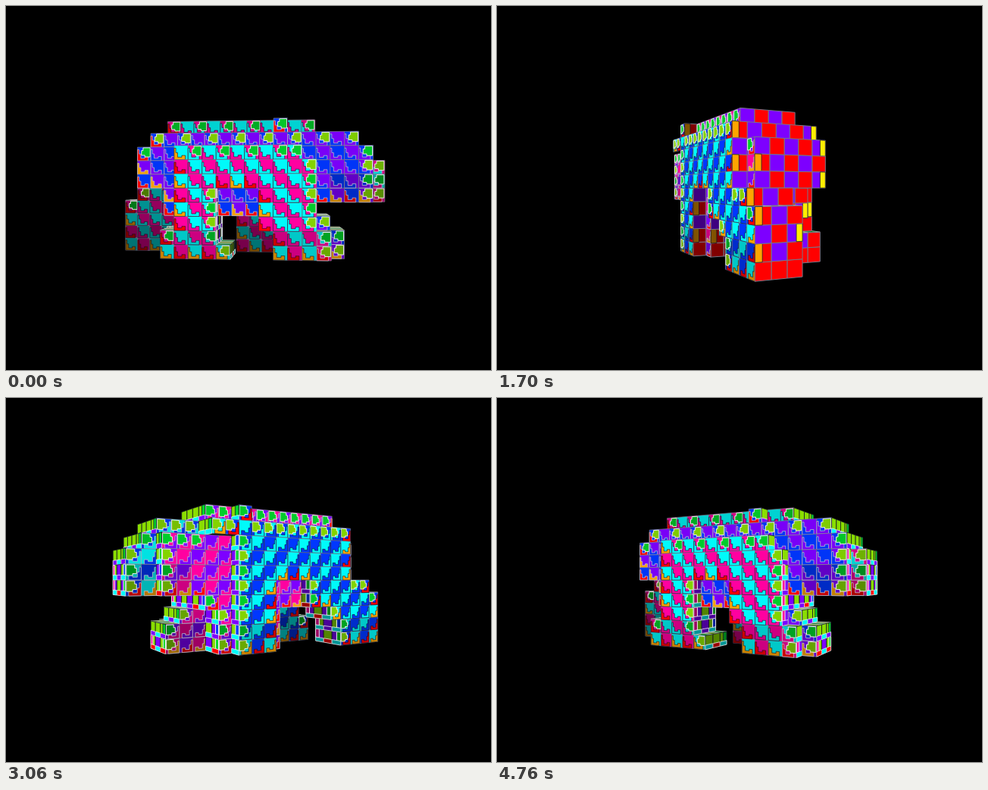
Write an HTML page with a canvas that moves like this. It is 640 by 480 pixels and loops after 5.1 s.

```html
<!DOCTYPE html>
<html lang="en">
<head>
<meta charset="utf-8">
<title>Turning block bear</title>
<style>
  html, body { margin: 0; width: 100%; height: 100%; overflow: hidden; background: #000; }
  canvas { display: block; width: 640px; height: 480px; }
</style>
</head>
<body>
<canvas id="stage" width="640" height="480"></canvas>
<script>
const ctx = document.getElementById('stage').getContext('2d');
const STEP_MS = 340, STEPS = 15, START = -5;
const FOCAL = 600, DIST = 35, Y0 = -5, Z0 = -3.75;

const C = {
  cyan: [0, 250, 250], blue: [0, 55, 255], magenta: [255, 0, 160], purple: [125, 0, 255],
  red: [255, 0, 0], orange: [255, 165, 0], yellow: [255, 238, 0],
  lime: [138, 222, 0], green: [0, 215, 45]
};

// Bear body: x runs rump to nose, y upward, z from far flank to near flank.
function solid(x, y, z) {
  if (z < 0 || z > 6 || y < 0 || y > 9 || x < -10 || x > 9) return false;
  const span = (a, b) => x >= a && x < b;
  const wide = z > 0 && z < 6, mid = z > 1 && z < 6;
  if (x >= 5) {
    if (y === 9 || y === 3) return false;
    if (y === 8) return x < 8 && mid;
    if (y > 3) return x === 9 ? y < 7 && z > 1 && z < 5 : x === 8 ? mid : wide;
    if (y === 2) return x === 5 && z > 2 && z < 6;
    return x < 7 && z > 2 && (z < 6 || x < 6);
  }
  if (y === 9) return span(-6, 5) && z > 0 && z < 5 || x === 2 && z < 6;
  if (y === 8) return x >= -7 && z < 6;
  if (y > 4) return z === 0 ? span(-7, 3) : z === 6 ? span(-5, y === 7 ? 4 : 5) : x >= -8;
  if (y > 2) {
    const rear = y === 4 ? -9 : -10;
    if (z === 0) return span(rear, -3) || span(0, 3);
    if (z === 6) return span(-5, -2) || span(1, 5);
    return x >= (z < 3 ? rear : -6);
  }
  const low = y < 2;
  if (z < 3) return span(-10, low ? -6 : -5) || (z ? span(-1, 4) : span(0, 3));
  if (x >= (low ? 2 : 1)) return true;
  return z > 3 && span(low ? -6 : -5, y ? -2 : -1);
}

const cells = [];
for (let x = -10; x < 10; x++)
  for (let y = 0; y < 10; y++)
    for (let z = 0; z < 7; z++)
      if (solid(x, y, z)) cells.push({
        x, y, z,
        front: !solid(x + 1, y, z), rear: !solid(x - 1, y, z),
        top: !solid(x, y + 1, z), under: !solid(x, y - 1, z),
        near: !solid(x, y, z + 1), far: !solid(x, y, z - 1)
      });

let sin = 0, cos = 1;
const clamp = v => Math.max(0, Math.min(1, v));
const shade = (c, b) => `rgb(${c.map(v => Math.round(v * b)).join()})`;

function project(x, y, z) {
  const s = FOCAL / (DIST - z * cos + x * sin);
  return [320 + (x * cos + z * sin) * s, 240 - y * s];
}

function poly(place, pts, fill, line, width = 1) {
  ctx.beginPath();
  for (const [u, v] of pts) ctx.lineTo(...place(u, v));
  ctx.closePath();
  ctx.fillStyle = fill;
  ctx.fill();
  ctx.strokeStyle = line;
  ctx.lineWidth = width;
  ctx.stroke();
}

const box = (a, b, c, d) => [[a, b], [c, b], [c, d], [a, d]];
const FULL = box(0, 0, 1, 1);
const HOOK = [[0, 0], [.8, 0], [.8, .3], [.55, .3], [.55, .18], [.25, .18], [.25, .5], [.12, .5], [.12, .82], [0, .82]];
const TAB = [[.3, .4], [.55, .4], [.55, .28], [.95, .28], [.95, .95], [.42, .95], [.42, .75], [.3, .75]];
const DARK = 'rgba(20,20,40,.75)', GREY = '#778', WHITE = '#eee';

function drawFlank(c, side) {
  const { x, y, z } = c, zf = Z0 + z + (side > 0 ? 1 : 0);
  const place = (u, v) => project(x + u, Y0 + y + v, zf);
  const odd = (x + y) & 1, layer = z & 1;
  let b = .55 + .45 * clamp((zf * side + 1) / 3.5);
  if (y < 2 || x >= 6 && y < 6) b *= .8;
  const pair = side > 0
    ? (layer ? [C.purple, C.blue] : [C.cyan, C.magenta])
    : (layer ? [C.magenta, C.purple] : [C.cyan, C.blue]);
  const line = layer || x >= 5 ? '#bbc' : DARK;
  poly(place, FULL, shade(pair[odd], b), GREY, .7);
  const edge = c.rear || c.under;
  const hook = edge ? (odd ? C.red : C.orange) : pair[1 - odd];
  poly(place, HOOK, shade(hook, b), line, .8);
  if (c.front || c.top && (side < 0 || odd))
    poly(place, TAB, shade(y & 1 ? C.green : C.lime, b * .95), WHITE);
}

function drawRear(c) {
  const { x, y, z } = c, b = x <= -5 ? 1 : .5;
  const place = (u, v) => project(x, Y0 + y + v, Z0 + z + u);
  const odd = (x + y + z) & 1;
  poly(place, FULL, shade(y === 0 || odd ? C.red : C.purple, b), GREY);
  if (y && c.near && !odd) poly(place, box(.6, 0, 1, 1), shade(C.yellow, b), DARK);
  if (y && c.far && odd) poly(place, box(0, 0, .45, 1), shade(C.orange, b), DARK);
}

function drawFront(c) {
  const { x, y, z } = c, b = x < 0 ? .6 : 1;
  const place = (u, v) => project(x + 1, Y0 + y + v, Z0 + z + u);
  const odd = (y + z) & 1;
  poly(place, FULL, shade(c.top || odd ? C.lime : C.purple, b), DARK);
  if (c.top) {
    if (c.far) poly(place, box(0, .3, .5, 1), shade(C.green, b), DARK);
  } else if (c.near) {
    poly(place, box(.55, .3, 1, 1), shade(C.magenta, b), WHITE);
  } else if (c.far) {
    poly(place, box(0, .3, .45, 1), shade(y & 1 ? C.blue : C.green, b), WHITE);
  }
  const strip = c.under ? (odd ? C.red : C.cyan) : odd ? C.cyan : C.purple;
  poly(place, box(0, 0, 1, .32), shade(strip, b), WHITE, .8);
}

function drawTop(c) {
  const { x, y, z } = c;
  const place = (u, v) => project(x + u, Y0 + y + 1, Z0 + z + v);
  poly(place, FULL, shade((x + z) & 1 ? C.lime : C.green, .55), '#ccc', .8);
}

function draw(angle) {
  sin = Math.sin(angle);
  cos = Math.cos(angle);
  const eyeX = -sin * DIST, eyeZ = cos * DIST;
  const reach = c => Math.abs(c.x + .5 - eyeX) + Math.abs(c.y - 4.5) + Math.abs(c.z + .5 + Z0 - eyeZ);
  ctx.fillStyle = '#000';
  ctx.fillRect(0, 0, 640, 480);
  ctx.lineJoin = 'round';
  cells.sort((a, b) => reach(b) - reach(a));
  for (const c of cells) {
    if (c.top && c.y < 4) drawTop(c);
    if (c.near && eyeZ > Z0 + c.z + 1) drawFlank(c, 1);
    if (c.far && eyeZ < Z0 + c.z) drawFlank(c, -1);
    if (c.rear && eyeX < c.x) drawRear(c);
    if (c.front && eyeX > c.x + 1) drawFront(c);
  }
}

let begin = null, shown = -1;
function tick(now) {
  if (begin === null) begin = now;
  const step = Math.floor((now - begin) / STEP_MS) % STEPS;
  if (step !== shown) {
    shown = step;
    draw((START + step * 360 / STEPS) * Math.PI / 180);
  }
  requestAnimationFrame(tick);
}
requestAnimationFrame(tick);
</script>
</body>
</html>
```
